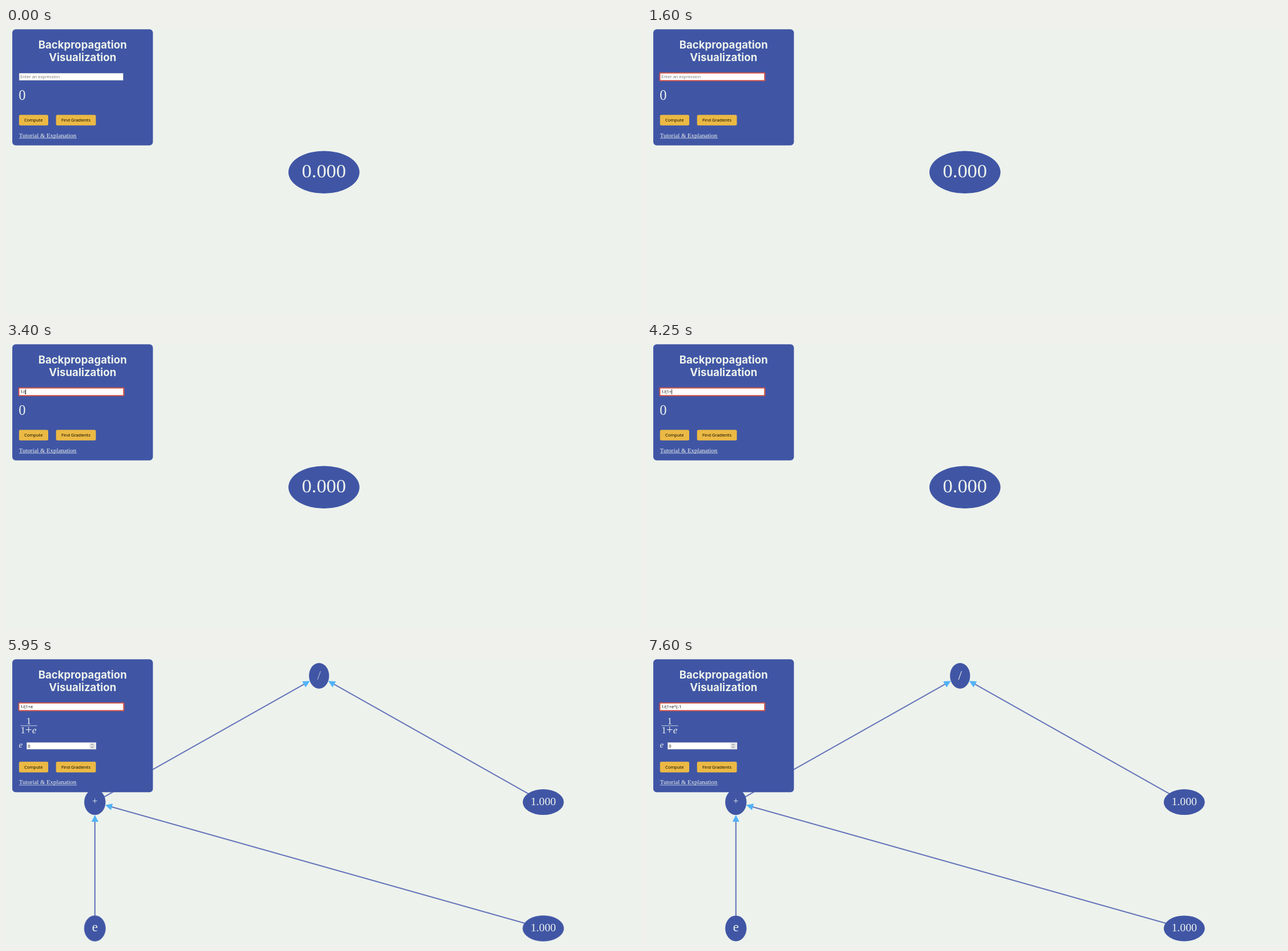
These frames come from a looping animation (1113x503 px, 8 s). An HTML page with a canvas:

```html
<!DOCTYPE html>
<html lang="en">
<head>
<meta charset="utf-8">
<title>Backpropagation Visualization</title>
<style>
  html, body { margin: 0; width: 100%; height: 100%; overflow: hidden; background: #edf2ec; }
  canvas { display: block; }
</style>
</head>
<body>
<canvas id="stage" width="1113" height="503"></canvas>
<script>
const ctx = document.getElementById('stage').getContext('2d');
const LOOP = 8000, GRAPH_AT = 5950, SETTLED_AT = 6100;
const PAPER = '#edf2ec', BLUE = '#4056a5', EDGE = '#6675bb', ARROW = '#50b3f8';
const YELLOW = '#ebb944', RED = '#cf5449';
const SANS = '7.5px "Open Sans", "Noto Sans", sans-serif';
const HEADING = '700 18.6px Inter, sans-serif';
const serif = (size, style = '') => `${style} ${size}px "Liberation Serif", serif`;

// time, typed text, caret visible
const typing = [
  [400, '', true], [1600, '', false], [1700, '1', true],
  [2450, '1/', true], [2800, '1/', false], [3400, '1/(', true],
  [3850, '1/(1', true], [4250, '1/(1+', true], [4800, '1/(1+e', true],
  [5200, '1/(1+e', false], [6100, '1/(1+e^', true], [6500, '1/(1+e^', false],
  [6700, '1/(1+e^(', true], [6950, '1/(1+e^(-', true],
  [7100, '1/(1+e^(-1', true], [7600, '1/(1+e^(-1', false]
];

const node = (x, y, rx, ry, label, size, baseline) => ({ x, y, rx, ry, label, size, baseline });
const result = node(557.3, 252.7, 62.3, 37.3, '0.000', 34.4, 261.5);
const divide = node(548.7, 31.2, 17.6, 22.5, '/', 23, 37.5);
const plus = node(155.8, 252.6, 18.7, 22.5, '+', 16, 256.3);
const variable = node(155.8, 473.9, 18.7, 22.5, 'e', 23, 479.2);
const upperOne = node(941.7, 252.6, 36, 22.5, '1.000', 19.8, 258);
const lowerOne = node(941.7, 473.9, 36, 22.5, '1.000', 19.8, 479.3);
const nodes = [divide, plus, upperOne, variable, lowerOne];
const edges = [[plus, divide], [upperOne, divide], [variable, plus], [lowerOne, plus]];

function text(str, x, y, font, color = PAPER, align = 'left') {
  ctx.font = font;
  ctx.fillStyle = color;
  ctx.textAlign = align;
  ctx.fillText(str, x, y);
}

function box(x, y, w, h, color, radius = 0) {
  ctx.fillStyle = color;
  ctx.beginPath();
  ctx.roundRect(x, y, w, h, radius);
  ctx.fill();
}

function line(color, width, ...points) {
  ctx.strokeStyle = color;
  ctx.lineWidth = width;
  ctx.beginPath();
  points.forEach(([x, y]) => ctx.lineTo(x, y));
  ctx.stroke();
}

function drawNode(n, settling = false) {
  ctx.fillStyle = BLUE;
  ctx.beginPath();
  ctx.ellipse(n.x, n.y, n.rx, n.ry, 0, 0, Math.PI * 2);
  ctx.fill();
  if (settling && (n === variable || n === lowerOne)) {
    ctx.strokeStyle = EDGE;
    ctx.lineWidth = 0.7;
    ctx.stroke();
  }
  const color = settling && n === divide ? '#b6c0d4' : PAPER;
  text(n.label, n.x, n.baseline, serif(n.size), color, 'center');
}

function drawEdge([from, to]) {
  const angle = Math.atan2(from.y - to.y, from.x - to.x);
  const reach = 1 / Math.hypot(Math.cos(angle) / to.rx, Math.sin(angle) / to.ry);
  const length = Math.hypot(from.x - to.x, from.y - to.y);
  ctx.save();
  ctx.translate(to.x, to.y);
  ctx.rotate(angle);
  line(EDGE, 2.1, [reach + 10, 0], [length, 0]);
  ctx.fillStyle = ARROW;
  ctx.beginPath();
  ctx.moveTo(reach, 0);
  ctx.lineTo(reach + 12, -6);
  ctx.lineTo(reach + 12, 6);
  ctx.fill();
  ctx.restore();
}

function drawExpressionInput(t) {
  const state = typing.filter(([start]) => t >= start).pop();
  if (state) {
    ctx.save();
    ctx.shadowColor = RED;
    ctx.shadowBlur = 1.5;
    box(21.8, 77.9, 185.4, 15, RED, 1.5);
    ctx.restore();
    box(23.4, 79.8, 181.9, 11.5, '#fff');
  } else {
    box(22.8, 79, 182.9, 13, t < 50 ? '#9a9cab' : '#676774', 0.5);
    box(23.4, 79.6, 181.7, 11.8, '#fff');
  }
  const [, typed, caret] = state || [0, '', false];
  if (typed) text(typed, 25.2, 88, SANS, '#000');
  else text('Enter an expression', 25, 88.2, SANS, '#757575');
  if (caret) {
    ctx.font = SANS;
    const x = 25 + Math.round(ctx.measureText(typed).width);
    box(x, 81, 0.8, 9, '#000');
  }
}

function drawFormula() {
  text('1', 39.8, 116, serif(17), PAPER, 'center');
  line(PAPER, 0.8, [25.5, 118.7], [54.5, 118.7]);
  text('1', 25.3, 132.3, serif(17));
  text('+', 39.6, 133, serif(21), PAPER, 'center');
  text('e', 45.8, 132.3, serif(17.5, 'italic'));

  text('e', 22.6, 157.2, serif(15, 'italic'));
  box(36, 147.8, 122.2, 12.4, '#9a9cab', 0.5);
  box(36.5, 148.3, 121.2, 11.4, '#fff');
  text('0', 38.3, 156.8, SANS, '#000');
  box(146.2, 148.8, 10.2, 10.4, '#e3e3e6');
  line('#555', 0.8, [149.2, 152.8], [151.2, 150.8], [153.2, 152.8]);
  line('#555', 0.8, [149.2, 155.4], [151.2, 157.4], [153.2, 155.4]);
}

function drawPanel(t, expanded) {
  const shift = expanded ? 29.6 : 0;
  box(11, 2.2, 246.5, 203.5 + shift, BLUE, 6);
  text('Backpropagation', 134.2, 36.2, HEADING, PAPER, 'center');
  text('Visualization', 134.2, 58.3, HEADING, PAPER, 'center');
  drawExpressionInput(t);
  if (expanded) drawFormula();
  else text('0', 22.2, 125.6, serif(24.5));

  ctx.save();
  ctx.translate(0, shift);
  box(22.8, 152.2, 51.2, 18.6, YELLOW, 2.5);
  box(87.7, 152.2, 69.8, 18.6, YELLOW, 2.5);
  text('Compute', 48.2, 164.2, SANS, '#000', 'center');
  text('Find Gradients', 122.6, 164.2, SANS, '#000', 'center');
  text('Tutorial & Explanation', 22.8, 191.7, serif(10.8));
  line(PAPER, 0.7, [22.8, 193.2], [124, 193.2]);
  ctx.restore();
}

function draw(t) {
  const expanded = t >= GRAPH_AT;
  box(0, 0, 1113, 503, PAPER);
  if (expanded) {
    edges.forEach(drawEdge);
    nodes.forEach(n => drawNode(n, t < SETTLED_AT));
  } else {
    drawNode(result);
  }
  drawPanel(t, expanded);
}

const start = performance.now();
function tick() {
  draw((performance.now() - start) % LOOP);
  requestAnimationFrame(tick);
}
tick();
</script>
</body>
</html>
```
